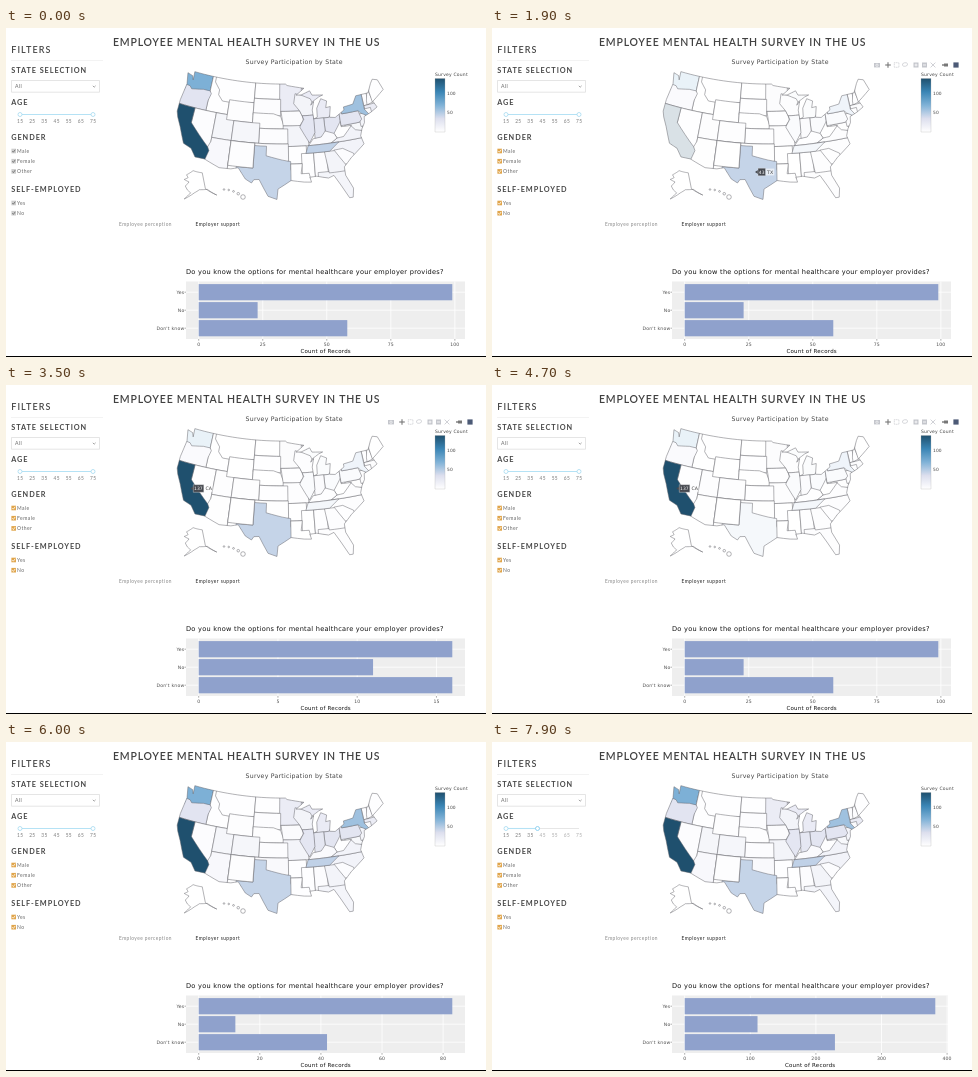
Animation of 480 by 329 pixels, one loop 8 s. Source, as an HTML page with a canvas:

```html
<!DOCTYPE html>
<html lang="en">
<head>
<meta charset="utf-8">
<title>Employee mental health survey</title>
<style>
html, body { margin: 0; width: 100%; height: 100%; overflow: hidden; background: #fff; }
canvas { display: block; width: 480px; height: 329px; }
</style>
</head>
<body>
<canvas id="stage" aria-label="Survey dashboard with a state map and a bar chart"></canvas>
<script>
const W = 480, H = 329, LOOP = 8000;
const canvas = document.getElementById('stage');
const ctx = canvas.getContext('2d');
const dpr = window.devicePixelRatio || 1;
canvas.width = W * dpr;
canvas.height = H * dpr;

const UI = 'Lato, "Open Sans", sans-serif';
const PLOT = '"DejaVu Sans", sans-serif';
const clamp = v => Math.max(0, Math.min(1, v));
const ramp = (t, a, b) => clamp((t - a) / (b - a));
const mix = (a, b, f) => a.map((v, i) => Math.round(v + (b[i] - v) * f));
const rgb = c => `rgb(${c})`;

// ---- drawing helpers ----
function text(str, x, cy, size, font, color, gap = 0, weight = 400, align = 'left') {
  ctx.font = `${weight} ${size}px ${font}`;
  ctx.letterSpacing = gap + 'px';
  ctx.textAlign = align;
  ctx.fillStyle = color;
  ctx.fillText(str, x, cy + size * 0.36);
}
function rect(x, y, w, h, color) {
  ctx.fillStyle = color;
  ctx.fillRect(x, y, w, h);
}
function line(color, width, ...p) {
  ctx.strokeStyle = color;
  ctx.lineWidth = width;
  ctx.beginPath();
  for (let i = 0; i < p.length; i += 2) ctx.lineTo(p[i], p[i + 1]);
  ctx.stroke();
}
function box(x, y, w, h, color, width = 0.7) {
  ctx.strokeStyle = color;
  ctx.lineWidth = width;
  ctx.strokeRect(x, y, w, h);
}
function dot(x, y, r, fill, stroke, width) {
  ctx.beginPath();
  ctx.arc(x, y, r, 0, 7);
  ctx.fillStyle = fill;
  ctx.fill();
  ctx.strokeStyle = stroke;
  ctx.lineWidth = width;
  ctx.stroke();
}

// ---- colour scale: evenly spaced stops from 0 to TOP ----
const TOP = 137, WHITE = [255, 255, 255];
const STOPS = [WHITE, [221, 223, 238], [128, 178, 215], [58, 133, 181], [31, 80, 110]];
function shade(count, alpha = 1) {
  const u = clamp(count / TOP) * (STOPS.length - 1);
  const i = Math.min(STOPS.length - 2, Math.floor(u));
  return rgb(mix(WHITE, mix(STOPS[i], STOPS[i + 1], u - i), alpha));
}

// ---- map: conic equal-area projection, longitudes in degrees west ----
const rad = d => d * Math.PI / 180;
function albers(mid, lon0, lat0, p1, p2, k, tx, ty) {
  const s1 = Math.sin(rad(p1)), n = (s1 + Math.sin(rad(p2))) / 2;
  const c = 1 - s1 * s1 + 2 * n * s1;
  const raw = (lon, lat) => {
    const r = Math.sqrt(c - 2 * n * Math.sin(rad(lat))) / n, a = n * rad(mid - lon);
    return [r * Math.sin(a), r * Math.cos(a)];
  };
  const o = raw(lon0, lat0);
  return (lon, lat) => {
    const p = raw(lon, lat);
    return [tx + k * (p[0] - o[0]), ty + k * (p[1] - o[1])];
  };
}
const K = 285.5, CX = 274.1, CY = 107.5;
const mainland = albers(96, 96.6, 38.7, 29.5, 45.5, K, CX, CY);
const north = albers(154, 156, 58.5, 55, 65, K * 0.35, CX - 0.307 * K, CY + 0.201 * K);

// Two points give a box along meridians and parallels, more give a polygon.
function trace(shape, proj = mainland) {
  let pts = shape.split(',').map(s => s.trim().split(' ').map(Number));
  if (pts.length === 2) {
    const [[w, n], [e, s]] = pts;
    pts = [[w, n], [e, n], [e, s], [w, s]];
  }
  const path = new Path2D();
  pts.forEach((p, i) => {
    const q = pts[(i + 1) % pts.length];
    const steps = Math.ceil(Math.abs(q[0] - p[0]) / 1.5) || 1;
    for (let j = 0; j < steps; j++) path.lineTo(...proj(...[0, 1].map(d => p[d] + (q[d] - p[d]) * j / steps)));
  });
  path.closePath();
  return path;
}

const coast = {
  north: '122.8 49,95.1 49,94.6 48.7,89.6 48,92 46.7,90.5 46.7,88 47.4,87.4 46.5,84.3 46.3,85.5 46,87.6 45.1,88 44.5,87.1 45.2,87.7 43.5,87.5 41.7,86.5 42,86.4 43.8,85 45.6,83.4 45,83.9 43.7,82.6 43.8,83.2 41.7,81.7 41.5,79 42.7,79 43.3,76.3 43.5,75 45,71.4 45,70 46.7,69.2 47.4,67.8 47',
  east: '67 44.8,70.7 43.1,70 41.8,72 41.1,74 40.6,74.3 39.4,75.3 38.3,76 37,75.6 35.3,77.8 34,79.3 33.1,81.3 31.5,81.3 29.8,80 27,80.4 25.2,81.2 25.2,82.7 28,84 30.1,85.3 29.7',
  south: '88 30.3,89.6 30.2,89.3 29.2,91 29.3,94 29.7,97 28,97.2 25.9,99.2 26.5,101.4 29.8,102.6 29.7,103.1 29,104.6 29.7,106.5 31.8,108.2 31.4,111 31.3,114.8 32.5',
  west: '117.1 32.5,118.5 34,120.6 34.6,122.5 37.6,123.8 39.3,124.4 40.4,124.5 42.8,124 46.2,124.7 48.4,123.1 48.1,122.6 47.3'
};
const land = trace(Object.values(coast).join());

// Painted in order: a later state covers the overlap, the coast clips the rest.
const states = [];
const state = (id, count, shape) => states.push({ id, count, path: trace(shape) });
state('WA', 70, '126 50,117 45');
state('ID', 1, '117 50,111.05 42');
state('OR', 29, '126 46.2,123 46,122.3 45.5,119 46,117 46,116.5 45.5,117 44,117 42,126 42');
state('MT', 1, '116.05 50,104.05 50,104.05 45,111.05 44.5,113 44.5,114.4 45.6,114.4 46.6,116.05 48');
state('NV', 3, '120 42,114.05 34');
state('UT', 10, '114.05 42,109.05 37');
state('WY', 2, '111.05 45,104.05 41');
state('AZ', 7, '114.05 37,109.05 37,109.05 30,115 30,114.6 35,114.05 36.2');
state('CA', 137, '126 42,120 42,120 39,114.6 35,114.1 34.3,114.8 32,126 32');
state('MN', 20, '97.2 50,89 43.5');
state('ND', 1, '104.05 50,96.8 45.9');
state('SD', 3, '104.05 45.9,96.5 42.6');
state('NE', 2, '104.05 43,98.5 43,96.5 42.5,95.3 40,104.05 40');
state('IA', 4, '96.4 43.5,91.2 43.5,90.2 41.8,91.4 40.5,95.8 40.6');
state('MO', 12, '95.8 40.6,89.3 36.5');
state('KS', 3, '102.05 40,94.6 37');
state('CO', 10, '109.05 41,102.05 37');
state('NM', 2, '109.05 37,103 31');
state('AR', 1, '94.6 36.5,90 33');
state('OK', 6, '103 37,94.5 33.5');
state('TX', 43, '103 36.5,100 36.5,100 34.6,96 33.8,94 33.5,94 32,93.6 31,93.6 25,107 25,107 32,103 32');
state('NM', 2, '109.05 37,103.03 32.02');
state('MS', 1, '91.3 35,88.3 30');
state('LA', 1, '94 33,91.2 33,91.6 31,89.7 31,89.5 30,88 28,94 28');
state('AL', 3, '88.3 35,85.2 30');
state('FL', 11, '87.6 31,79 24');
state('NC', 13, '84.3 36.6,75 33');
state('SC', 3, '83.2 35.1,81 35.2,78.6 33.9,78 32,83 32');
state('GA', 12, '85.6 35,83.1 35,81 32.1,80 30.7,85 30.7');
state('MI', 21, '90.4 48,82 41.7');
state('OH', 28, '84.8 41.7,83.4 41.7,82 43,80.5 42,80.5 38,84.8 38');
state('IN', 26, '87.6 41.75,84.8 37.8');
state('WI', 12, '92.3 47,90.4 46.6,88 45.8,87.5 45,86 45,87.5 42.5,90.6 42.5,91.2 43.5,92.8 45');
state('IL', 27, '90.6 42.5,87.5 42.5,87.5 39,89.1 37,91.4 40.3,90.2 41.8');
state('MD', 8, '79.5 39.7,75 38');
state('VA', 13, '83.7 36.6,75 36.6,75 37.9,77 38.4,78 39.4,82 37.4');
state('WV', 1, '82 37.4,80.3 37.5,77.8 39.4,80.5 39.5,80.5 40.6,82.6 38.4');
state('KY', 5, '89.4 36.5,83.7 36.6,82 37.4,82.6 38.4,84.8 39.1,86 38,88.1 37.8');
state('TN', 45, '90.2 35,84.3 35,81.7 36.6,89.5 36.5');
state('NJ', 11, '75.4 41.3,73.5 38.8');
state('PA', 28, '80.5 43,79.8 42,75.3 42,74.8 40.2,75.6 39.7,80.5 39.7');
state('VT', 3, '73.4 46,72 42.7');
state('NH', 3, '72.4 43.5,71.4 46,70.7 43,72.5 42.7');
state('ME', 1, '71.1 45.3,70 48,66 48,66 43,70.9 43');
state('MA', 20, '73.4 42.7,69 41');
state('CT', 4, '73.6 42.05,71.8 40.8');
state('NY', 57, '79.8 42,75.3 42,74.7 41.4,72 40,73.5 42,73.4 46,79.8 46');

const alaska = trace('156 71.3,141 69.6,141 60.3,131 55,139 59.7,148 60.2,154 58.5,164 54.6,158 58.5,162 60,165 62,161 64.6,168 65.6,163 67,166 68.5', north);

function picked(t) {
  if (t < 1900 || t >= 5200) return null;
  return t < 3500 ? ['TX'] : t < 4700 ? ['TX', 'CA'] : ['CA'];
}
function map(t) {
  const sel = picked(t), ink = '#66666c';
  ctx.lineJoin = 'round';
  ctx.strokeStyle = ink;
  ctx.lineWidth = 0.5;
  ctx.save();
  ctx.clip(land);
  for (const s of states) {
    ctx.fillStyle = shade(s.count, !sel || sel.includes(s.id) ? 1 : 0.17);
    ctx.fill(s.path);
    ctx.stroke(s.path);
  }
  ctx.restore();
  ctx.stroke(land);
  ctx.stroke(alaska);
  for (let i = 0; i < 5; i++) {
    const f = i / 4;
    dot(218 + 19 * f, 161.5 + 7.5 * f * f, 0.8 + 1.5 * f ** 4, '#fff', ink, 0.5);
  }
  text('Survey Participation by State', 288.2, 33.5, 6.2, PLOT, '#444', 0.25, 400, 'center');
}

function legend() {
  const g = ctx.createLinearGradient(0, 104, 0, 50.5);
  STOPS.forEach((c, i) => g.addColorStop(i / (STOPS.length - 1), rgb(c)));
  rect(429, 50.5, 10, 53.5, g);
  box(429, 50.5, 10, 53.5, '#aaa', 0.3);
  text('Survey Count', 429, 46, 4.5, PLOT, '#444', 0.2);
  for (const n of [50, 100]) text(String(n), 441, 104 - 53.5 * n / TOP, 4.4, PLOT, '#444', 0.1);
}

function tip(x, y, count, name) {
  const w = count.length * 3 + 1.5;
  ctx.beginPath();
  ctx.moveTo(x, y);
  ctx.lineTo(x + 3, y - 2);
  ctx.rect(x + 3, y - 3.8, w, 7.6);
  ctx.moveTo(x, y);
  ctx.lineTo(x + 3, y + 2);
  ctx.lineTo(x + 3, y - 2);
  ctx.fillStyle = '#45484f';
  ctx.fill();
  box(x + 3, y - 3.8, w, 7.6, '#ddd', 0.4);
  text(count, x + 3.8, y, 4.5, PLOT, '#fff');
  rect(x + 3.4 + w, y - 3.4, 8.4, 6.8, 'rgba(255,255,255,.6)');
  text(name, x + 4.6 + w, y, 4.7, PLOT, '#444', 0.1);
}
function hover(t) {
  if (t >= 1600 && t < 2200) tip(263, 144, '43', 'TX');
  if (t >= 2300 && t < 5600) tip(184.3, 103.5, '137', 'CA');
}

function modebar(t) {
  ctx.globalAlpha = ramp(t, 1100, 1400) * (1 - ramp(t, 5500, 5800));
  const c = '#c4c6cc', y = 37;
  rect(382, 35, 6, 4.4, c);
  dot(385, 37.2, 1.2, c, '#fff', 0.6);
  line('#777', 1.1, 393.2, y, 398.8, y);
  line('#777', 1.1, 396, y - 2.8, 396, y + 2.8);
  ctx.setLineDash([1, 0.6]);
  box(402.3, 34.7, 4.6, 4.6, c);
  ctx.setLineDash([]);
  ctx.beginPath();
  ctx.ellipse(413, 36.5, 2.6, 1.8, -0.2, 0, 7);
  ctx.stroke();
  for (const x of [424, 432.5]) {
    rect(x - 2.5, 34.5, 5, 5, c);
    line('#fff', 0.8, x - 1.5, y, x + 1.5, y);
  }
  line('#fff', 0.8, 424, y - 1.5, 424, y + 1.5);
  for (const d of [-2.4, 2.4]) line(c, 0.8, 438.6, y - d, 443.4, y + d);
  line('#777', 3, 452, y, 456, y);
  line('#777', 1.4, 450, y, 453, y);
  rect(461.4, 34.4, 5.2, 5.2, '#4c5a76');
  ctx.globalAlpha = 1;
}

// ---- filters ----
function check(label, y, warm) {
  rect(5.4, y - 2.3, 4.6, 4.6, rgb(mix([205, 205, 205], [224, 165, 75], warm)));
  line(warm < 0.5 ? '#666' : '#fff', 0.8, 6.3, y, 7.4, y + 1.2, 9.2, y - 1.3);
  text(label, 11, y, 5, UI, '#666', 0.45);
}
function handleX(t) {
  const s = Math.floor(t / 100) * 100;
  return 87 - 40.2 * ramp(s, 7200, 7500) - 1.3 * ramp(s, 7800, 7900);
}
function slider(t) {
  const y = 86.5, end = handleX(t);
  line('#e6e6e6', 1.1, 14, y, 87, y);
  line('#b5e2f5', 1.1, 14, y, end, y);
  for (let i = 0; i < 7; i++) {
    const x = 14 + i * 73 / 6;
    text(String(15 + i * 10), x + 0.2, 93.6, 4.8, UI, x <= end + 1 ? '#777' : '#aaa', 0.4, 400, 'center');
  }
  const hot = (t >= 6500 && t < 6800) || t >= 7100;
  dot(14, y, 2, '#fff', '#a5daf0', 0.8);
  dot(end, y, 2, '#fff', hot ? '#7cc8ec' : '#a5daf0', 0.8);
}
function filters(t) {
  const head = (s, y) => text(s, 5.2, y, 7.3, UI, '#484848', 0.95, 700);
  text('FILTERS', 5.2, 21.5, 9, UI, '#484848', 1.1, 600);
  line('#eeeeee', 0.7, 5, 32.5, 97, 32.5);
  head('STATE SELECTION', 42);
  head('AGE', 74);
  head('GENDER', 109);
  head('SELF-EMPLOYED', 161);
  box(5.5, 52.5, 88, 11.7, '#dadada');
  text('All', 9, 58.4, 5.2, UI, '#666', 0.4);
  line('#999', 0.9, 86.8, 57.8, 88.2, 59.2, 89.6, 57.8);
  slider(t);
  const warm = ramp(t, 700, 1000);
  ['Male', 'Female', 'Other'].forEach((s, i) => check(s, 123 + i * 10.2, warm));
  ['Yes', 'No'].forEach((s, i) => check(s, 175 + i * 10.2, warm));
}

// ---- bar chart ----
const BOTH = { v: [99, 23, 58], step: 25 };
const TEXAS = { v: [16, 11, 16], step: 5 };
const CALIF = { v: [83, 12, 42], step: 20 };
const ALL = { v: [382, 111, 229], step: 100, inset: 3 };
const dataAt = t => t < 2300 ? BOTH : t < 3700 ? TEXAS : t < 5000 ? BOTH : t < 6100 ? CALIF : ALL;

function bars(t) {
  const { v, step, inset = 0 } = dataAt(t);
  const left = 180, x0 = 192.7, right = 459 - inset, ink = '#4d4d4d';
  const unit = (253.6 - inset) / Math.max(...v);
  text('Do you know the options for mental healthcare your employer provides?', left, 243.8, 6.6, PLOT, '#111', 0.26);
  rect(left, 253.5, right - left, 57.5, '#eeeeee');
  for (let n = 0; x0 + n * unit < right; n += step) {
    const x = x0 + n * unit;
    line('#fff', 0.8, x, 253.5, x, 311);
    line('#777', 0.6, x, 311, x, 312.7);
    text(String(n), x, 316, 4.6, PLOT, ink, 0.1, 400, 'center');
  }
  ['Yes', 'No', "Don't know"].forEach((name, i) => {
    const y = 264.2 + i * 18;
    line('#fff', 0.8, left, y, right, y);
    line('#777', 0.6, left - 1.5, y, left, y);
    rect(x0, y - 8.1, v[i] * unit, 16.2, '#8fa1cc');
    text(name, 178.4, y, 4.6, PLOT, ink, 0.2, 400, 'right');
  });
  text('Count of Records', (left + right) / 2 + 0.2, 323, 5.5, PLOT, '#111', 0.22, 400, 'center');
}

function draw(t) {
  ctx.setTransform(dpr, 0, 0, dpr, 0, 0);
  rect(0, 0, W, H, '#fff');
  text('EMPLOYEE MENTAL HEALTH SURVEY IN THE US', 107, 14.5, 10.5, UI, '#404040', 0.78, 600);
  filters(t);
  map(t);
  legend();
  hover(t);
  modebar(t);
  text('Employee perception', 113, 196, 4.8, UI, '#888', 0.45);
  text('Employer support', 189.5, 196, 4.8, UI, '#333', 0.45, 500);
  bars(t);
  rect(0, 328, W, 1, '#000');
}

const start = performance.now();
function tick() {
  draw((performance.now() - start) % LOOP);
  requestAnimationFrame(tick);
}
tick();
</script>
</body>
</html>
```
